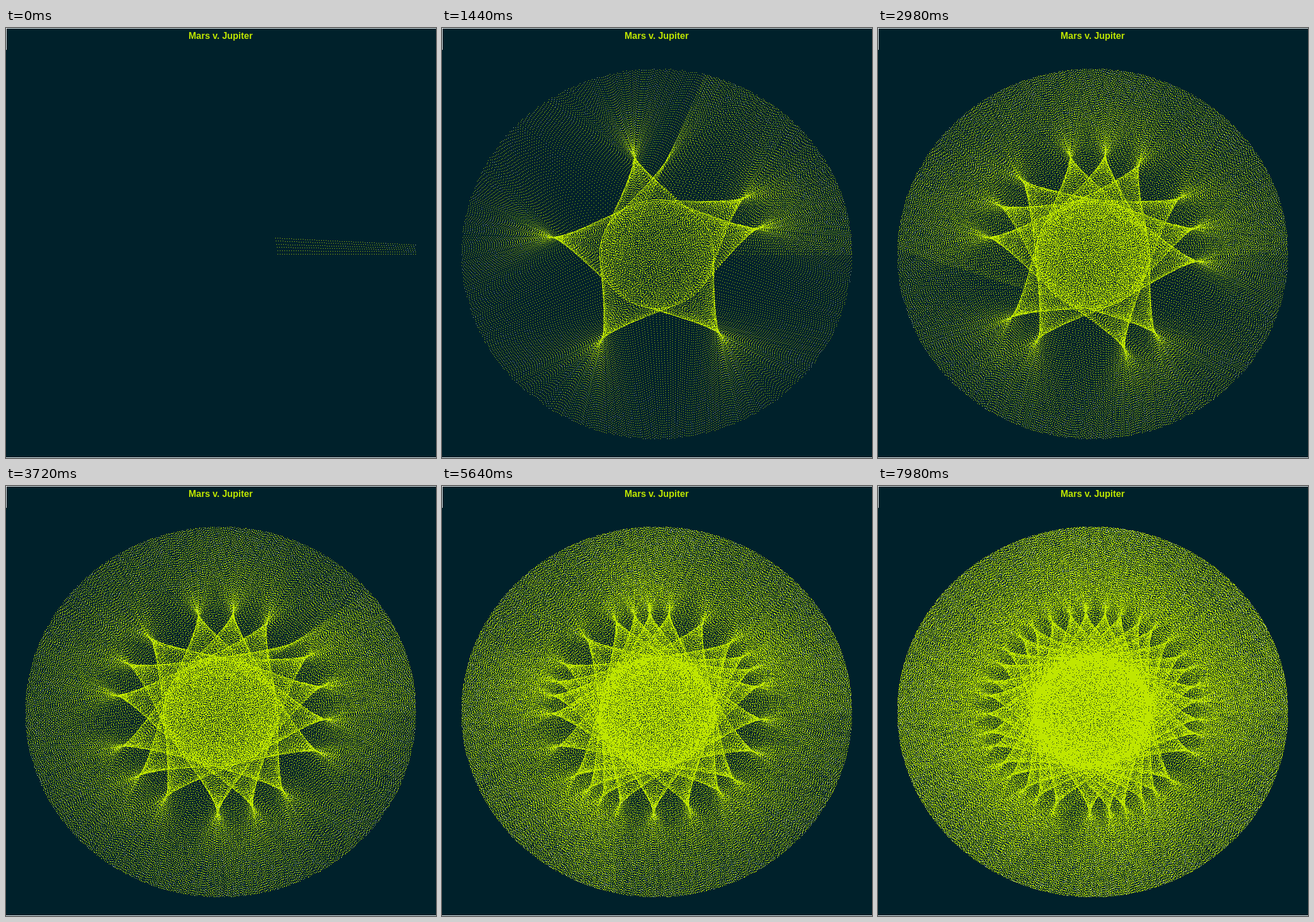
An HTML page with a canvas that plays this animation: 749 px wide and 748 px high, repeating every 8 s.

```html
<!DOCTYPE html>
<html lang="en">
<head>
<meta charset="utf-8">
<title>Mars v. Jupiter</title>
<style>
  html, body { margin: 0; width: 100%; height: 100%; overflow: hidden; background: #00212b; }
  canvas { position: absolute; left: 0; top: 0; }
  h1 {
    position: absolute; left: 318px; top: 4px; margin: 0; white-space: nowrap;
    font: bold 16px/19px "Liberation Sans", Arial, sans-serif;
    color: #bfe600;
  }
  .edge { position: absolute; left: 0; top: 0; background: #fff; }
</style>
</head>
<body>
<canvas width="749" height="748"></canvas>
<h1>Mars v. Jupiter</h1>
<div class="edge" style="width:749px;height:1px"></div>
<div class="edge" style="width:1px;height:38px"></div>
<div class="edge" style="width:749px;height:1px;top:747px"></div>
<script>
const WIDTH = 749, HEIGHT = 748;
const LOOP = 8000, FRAME = 20;
const FIRST_LINES = 6, LINES_PER_FRAME = 11;
const CENTER = { x: 374, y: 393 };
const JUPITER_STEP = 0.5464 * Math.PI / 180;
const MARS_STEP = JUPITER_STEP * 6.281;
const JUPITER = { rx: 340, ry: 322, step: JUPITER_STEP };
const MARS = { rx: 99.6, ry: 94.4, step: MARS_STEP };
const DOT_GAP = 4;
const LIME = 0xff00e6bf, PALE = 0xffb4dcc8; // ABGR

const ctx = document.querySelector('canvas').getContext('2d');
const image = ctx.createImageData(WIDTH, HEIGHT);
const pixels = new Uint32Array(image.data.buffer);
let drawnLines = 0;

function position(planet, index) {
  const angle = planet.step * index;
  return {
    x: Math.floor(CENTER.x + planet.rx * Math.cos(angle)),
    y: Math.floor(CENTER.y - planet.ry * Math.sin(angle))
  };
}

function noise(x, y) {
  const v = Math.sin(x * 12.9898 + y * 78.233) * 43758.5453;
  return v - Math.floor(v);
}

// One dot every DOT_GAP pixels along the longer axis, counted from Mars.
function drawLine(index) {
  const from = position(MARS, index), to = position(JUPITER, index);
  const dx = to.x - from.x, dy = to.y - from.y;
  const length = Math.max(Math.abs(dx), Math.abs(dy));
  for (let i = 0; i <= length; i += DOT_GAP) {
    const t = i / length;
    const x = Math.round(from.x + dx * t), y = Math.round(from.y + dy * t);
    const pale = noise(x, y) < 0.25 * (t - 0.45);
    pixels[y * WIDTH + x] = pale ? PALE : LIME;
  }
}

function render(now) {
  const frame = Math.floor((now % LOOP) / FRAME);
  const lines = FIRST_LINES + LINES_PER_FRAME * frame;
  if (lines < drawnLines) {
    pixels.fill(0);
    drawnLines = 0;
  }
  if (lines > drawnLines) {
    while (drawnLines < lines) drawLine(drawnLines++);
    ctx.putImageData(image, 0, 0);
  }
}

const start = performance.now();
function tick() {
  render(performance.now() - start);
  requestAnimationFrame(tick);
}
tick();
</script>
</body>
</html>
```
